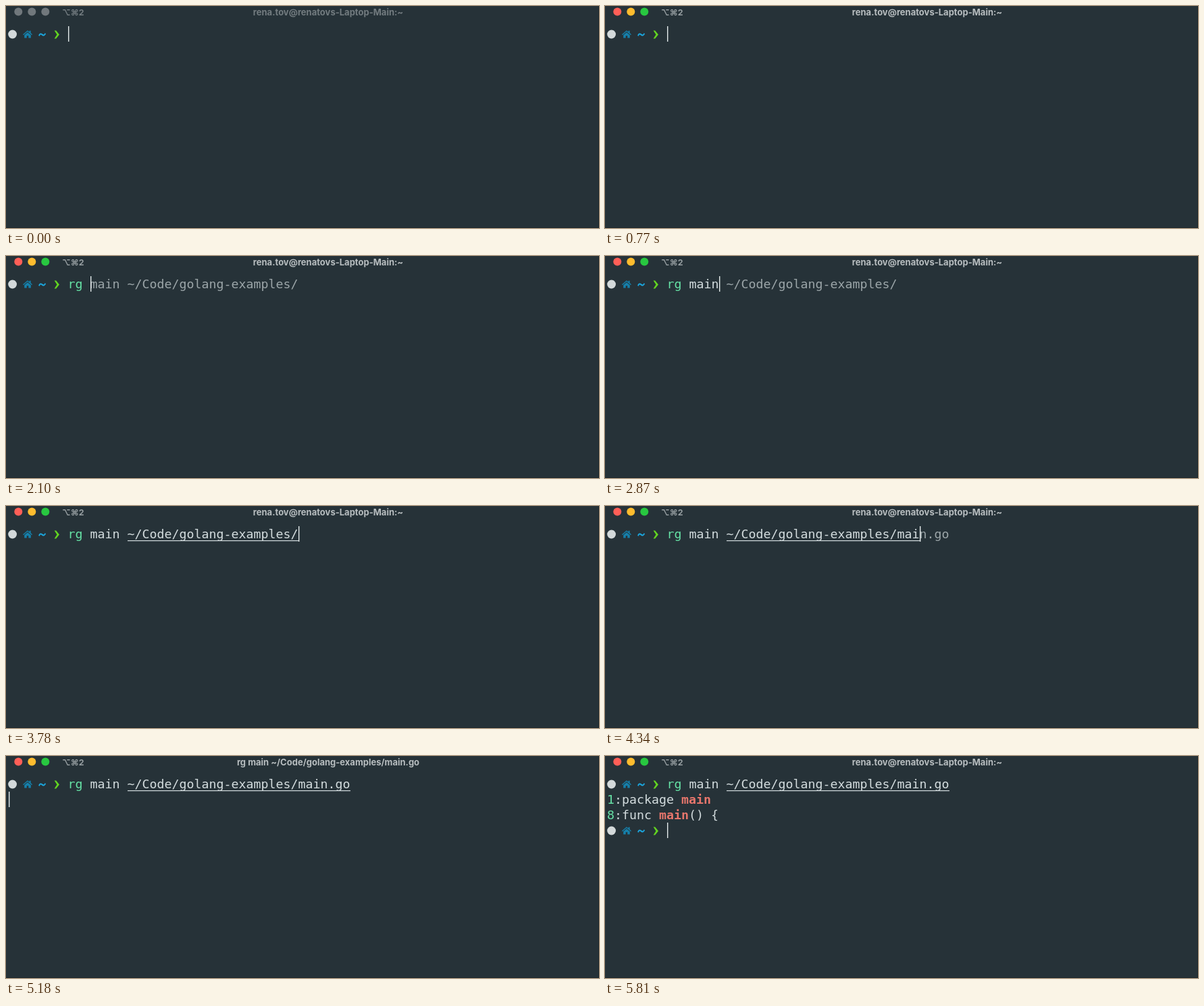
Recreate the animation shown at these times as an HTML page. Size 878 px wide and 330 px high, loop 6930 ms.

```html
<!DOCTYPE html>
<html lang="en">
<head>
<meta charset="utf-8">
<title>Terminal search</title>
<style>
  html, body { margin: 0; width: 100%; height: 100%; overflow: hidden; background: #263238; }
  svg { display: block; }
  .mono { font: 18.27px "DejaVu Sans Mono", monospace; white-space: pre; fill: #d3dcde; }
  .bar { font: 700 13px Inter, "DejaVu Sans", sans-serif; fill: #b8bec0; }
  #keys { font-size: 12.4px; fill: #969ea1; }
  .green { fill: #66e2a6; }
  .hint { fill: #9ba5a8; }
  .match { fill: #e7766c; font-weight: 700; }
  .inactive .bar, .inactive #keys { fill: #737c80; }
  .inactive #lights circle { fill: #71787c; }
</style>
</head>
<body>
<svg id="window" width="878" height="330" viewBox="0 0 878 330">
  <rect width="878" height="330" fill="#263238"/>
  <path d="M0 329.5H878M877.5 0V330" stroke="#1c262b"/>
  <g id="lights">
    <circle cx="18.3" cy="8.5" r="6" fill="#ff5f57"/>
    <circle cx="38.3" cy="8.5" r="6" fill="#febc2e"/>
    <circle cx="58.3" cy="8.5" r="6" fill="#28c840"/>
  </g>
  <text id="keys" class="bar" x="83" y="13.5">⌥⌘2</text>
  <text id="title" class="bar" x="477" y="13.5" text-anchor="middle"></text>

  <g id="prompt">
    <circle cx="9.6" cy="42" r="6.4" fill="#d3d9da"/>
    <g fill="#1580ab">
      <path d="M25 42.2 32 36.2 34.6 38.4V36.8H36.6V40.1L39 42.2 38.1 43.2 32 38.1 25.9 43.2Z"/>
      <path d="M27.2 43.2 32 39.2 36.8 43.2V47.6H33.3V44.3H30.7V47.6H27.2Z"/>
    </g>
    <path d="M49 44.4C50.2 40.6 51.8 41.2 53.6 42.6S57 44.4 58.2 40.8" fill="none" stroke="#1ba6de" stroke-width="2"/>
    <path d="M71.6 36.4H74.2L79 42.5 74.2 48.6H71.6L75.4 42.5Z" fill="#62d321"/>
  </g>

  <text class="mono" x="91.6" y="48.2"><tspan id="name" class="green"></tspan><tspan id="args"></tspan><tspan id="hint" class="hint"></tspan></text>
  <rect id="underline" x="180" y="51" height="1.2" fill="#d3dcde"/>

  <g id="output">
    <text class="mono" x="3" y="71.2"><tspan class="green">1</tspan>:package <tspan class="match">main</tspan></text>
    <text class="mono" x="3" y="94.2"><tspan class="green">8</tspan>:func <tspan class="match">main</tspan>() {</text>
    <use href="#prompt" y="69"/>
  </g>
  <rect id="cursor" width="1.4" height="23" fill="#e4eaeb"/>
</svg>
<script>
const LOOP = 6930, CELL = 11, PATH_START = 8;
const FOCUS = 770, ENTER = 5180, RESULT = 5250, DONE = 5320;
const command = "rg main ~/Code/golang-examples/main.go";
const homeTitle = "rena.tov@renatovs-Laptop-Main:~";

// [time, typed characters, characters visible including the suggestion]
const typing = [
  [0, 0, 0], [1680, 1, 1], [1750, 1, 31], [1960, 2, 31], [2100, 3, 31],
  [2590, 4, 31], [2730, 5, 31], [2800, 6, 31], [2870, 7, 31], [3290, 31, 31],
  [4060, 32, 38], [4200, 33, 38], [4270, 34, 38], [4410, 35, 38],
  [4620, 36, 38], [4760, 37, 38], [4900, 38, 38]
];

const el = id => document.getElementById(id);
const setText = (id, text) => {
  if (el(id).textContent !== text) el(id).textContent = text;
};

function render(t) {
  const [, typed, visible] = typing.findLast(step => step[0] <= t);
  const running = t >= ENTER && t < DONE;
  const finished = t >= RESULT;

  el("window").classList.toggle("inactive", t < FOCUS);
  setText("title", running ? command : homeTitle);
  setText("name", command.slice(0, Math.min(typed, 2)));
  setText("args", command.slice(2, Math.max(typed, 2)));
  setText("hint", command.slice(typed, visible));
  el("underline").setAttribute("width", Math.max(0, typed - PATH_START) * CELL);
  el("output").style.display = finished ? "" : "none";

  const column = t < ENTER ? typed : finished ? 0 : -PATH_START;
  const row = finished ? 3 : t >= ENTER ? 1 : 0;
  el("cursor").setAttribute("x", 92 + column * CELL);
  el("cursor").setAttribute("y", 30 + row * 23);
}

const start = performance.now();
function tick() {
  render((performance.now() - start) % LOOP);
  requestAnimationFrame(tick);
}
tick();
</script>
</body>
</html>
```
